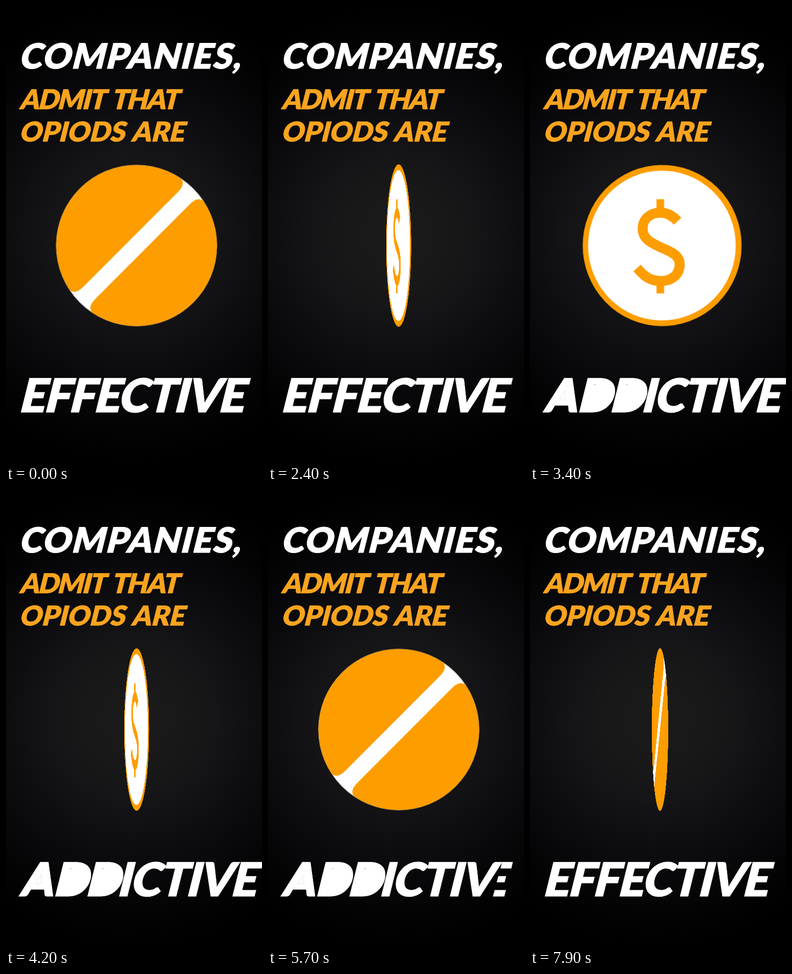
An HTML page that plays this animation: 500 px wide and 889 px high, repeating every 8000 ms.

```html
<!DOCTYPE html>
<html lang="en">
<head>
<meta charset="utf-8">
<title>Companies, admit</title>
<style>
  html, body { margin: 0; width: 100%; height: 100%; overflow: hidden; background: #000; }
  #stage {
    position: absolute; left: 0; top: 0; width: 500px; height: 889px; overflow: hidden;
    background: radial-gradient(circle at 251px 446px,
      #1c1b1c 0, #191819 100px, #151416 160px, #0e0d0f 240px, #070608 330px, #000 440px);
  }
  svg { position: absolute; left: 0; top: 0; overflow: visible; }
  text {
    font-family: Lato, "Open Sans", sans-serif; font-weight: 900;
    fill: #fff; stroke: #fff; stroke-width: .8;
  }
  .accent { fill: #f9a41f; stroke: #f9a41f; }
  #scene {
    position: absolute; left: 94.5px; top: 307.4px; width: 320px; height: 320px;
    perspective: 1047px;
  }
  #coin { position: absolute; width: 320px; height: 320px; }
</style>
</head>
<body>
<div id="stage">
  <svg width="500" height="889" viewBox="0 0 500 889">
    <defs>
      <clipPath id="before"><polygon id="beforeEdge"/></clipPath>
      <clipPath id="after"><polygon id="afterEdge"/></clipPath>
    </defs>
    <g transform="translate(24 122) skewX(-14)">
      <text font-size="68" letter-spacing="1.6">COMPANIES,</text>
    </g>
    <g transform="translate(26 201) skewX(-14)">
      <text class="accent" font-size="53" letter-spacing="-2.5" word-spacing="7">ADMIT THAT</text>
    </g>
    <g transform="translate(25 264) skewX(-14)">
      <text class="accent" font-size="53" letter-spacing="0" word-spacing="3">OPIODS ARE</text>
    </g>
    <g id="effective" clip-path="url(#after)">
      <g transform="translate(23 792) skewX(-14)">
        <text font-size="91" letter-spacing="-3.1">EFFECTIVE</text>
      </g>
    </g>
    <g id="addictive" clip-path="url(#before)">
      <g transform="translate(0 792) skewX(-14)">
        <text x="26 90 153 215" font-size="91" letter-spacing="-3">ADDICTIVE</text>
        <!-- closed counters -->
        <g fill="#fff">
          <path d="M58,-52 L43,-13 H75 Z"/>
          <rect x="106" y="-55" width="37" height="45" rx="13"/>
          <rect x="169" y="-55" width="37" height="45" rx="13"/>
        </g>
        <path d="M58,-42 L51,-24 H63 Z" fill="none" stroke="#e4e2e4" stroke-width=".8"/>
      </g>
    </g>
  </svg>
  <div id="scene">
    <div id="coin">
      <svg width="320" height="320" viewBox="-160 -160 320 320">
        <defs>
          <path id="half" d="M-128,-16.5 H128 C142,-16.5 151,-19 153.5,-30 A156.4,156.4 0 0 0 -153.5,-30 C-151,-19 -142,-16.5 -128,-16.5 Z"/>
        </defs>
        <g id="pill">
          <circle r="156.3" fill="#fff" stroke="#b8b2a4" stroke-width=".8"/>
          <g transform="rotate(-45)" fill="#fd9d00">
            <use href="#half"/>
            <use href="#half" transform="scale(1 -1)"/>
          </g>
        </g>
        <g id="dollar">
          <circle r="151" fill="#fff" stroke="#fd9d00" stroke-width="11"/>
          <g fill="none" stroke="#fd9d00">
            <path stroke-width="19.5" d="M34,-47 C23,-59 12,-64 0,-64 C-20,-64 -35,-52 -35,-33 C-35,-12 -17,-5 2,4 C24,13 38,20 38,36 C38,57 22,69 0,69 C-20,69 -32,60 -46,44"/>
            <path stroke-width="15" d="M0,-90 V-66 M0,70 V93"/>
          </g>
        </g>
      </svg>
    </div>
  </div>
</div>
<script>
const LOOP = 8000;
const $ = id => document.getElementById(id);

// [time, turn in degrees]: 0 is the pill face, 180 the dollar face
const turns = [
  [0, 0], [900, .8], [1150, 3], [1350, 10], [1535, 21], [2235, 84], [3300, 180],
  [4200, 99], [4700, 55], [5100, 25], [5250, 15], [5400, 8], [5600, 2.5], [5800, 0],
  [6750, 0], [6850, 1], [7000, 7], [7200, 21], [7900, 84], [8000, 93]
];

function sample(keys, t) {
  let i = 1;
  while (i < keys.length - 1 && t > keys[i][0]) i++;
  const [t0, a] = keys[i - 1], [t1, b] = keys[i];
  return a + (b - a) * (t - t0) / (t1 - t0);
}

const ramp = (t, from, to) => Math.min(1, Math.max(0, (t - from) / (to - from)));

// Slanted wipe: the second word covers the stage left of x
function wipe(x) {
  const edge = `${x + 16},700 ${x - 16},820`;
  $('beforeEdge').setAttribute('points', `-200,700 ${edge} -200,820`);
  $('afterEdge').setAttribute('points', `800,700 ${edge} 800,820`);
}

function draw(t) {
  const turn = sample(turns, t);
  const front = turn < 90;
  const angle = front ? turn : 180 - turn;
  $('coin').style.transform = `rotateY(${-angle}deg) translateZ(3.5px)`;
  $('pill').style.display = front ? '' : 'none';
  $('dollar').style.display = front ? 'none' : '';

  const shown = ramp(t, 2550, 2850) - ramp(t, 5650, 5950);
  wipe(-50 + 600 * shown);
}

const start = performance.now();
function tick() {
  draw((performance.now() - start) % LOOP);
  requestAnimationFrame(tick);
}
draw(0);
requestAnimationFrame(tick);
</script>
</body>
</html>
```
